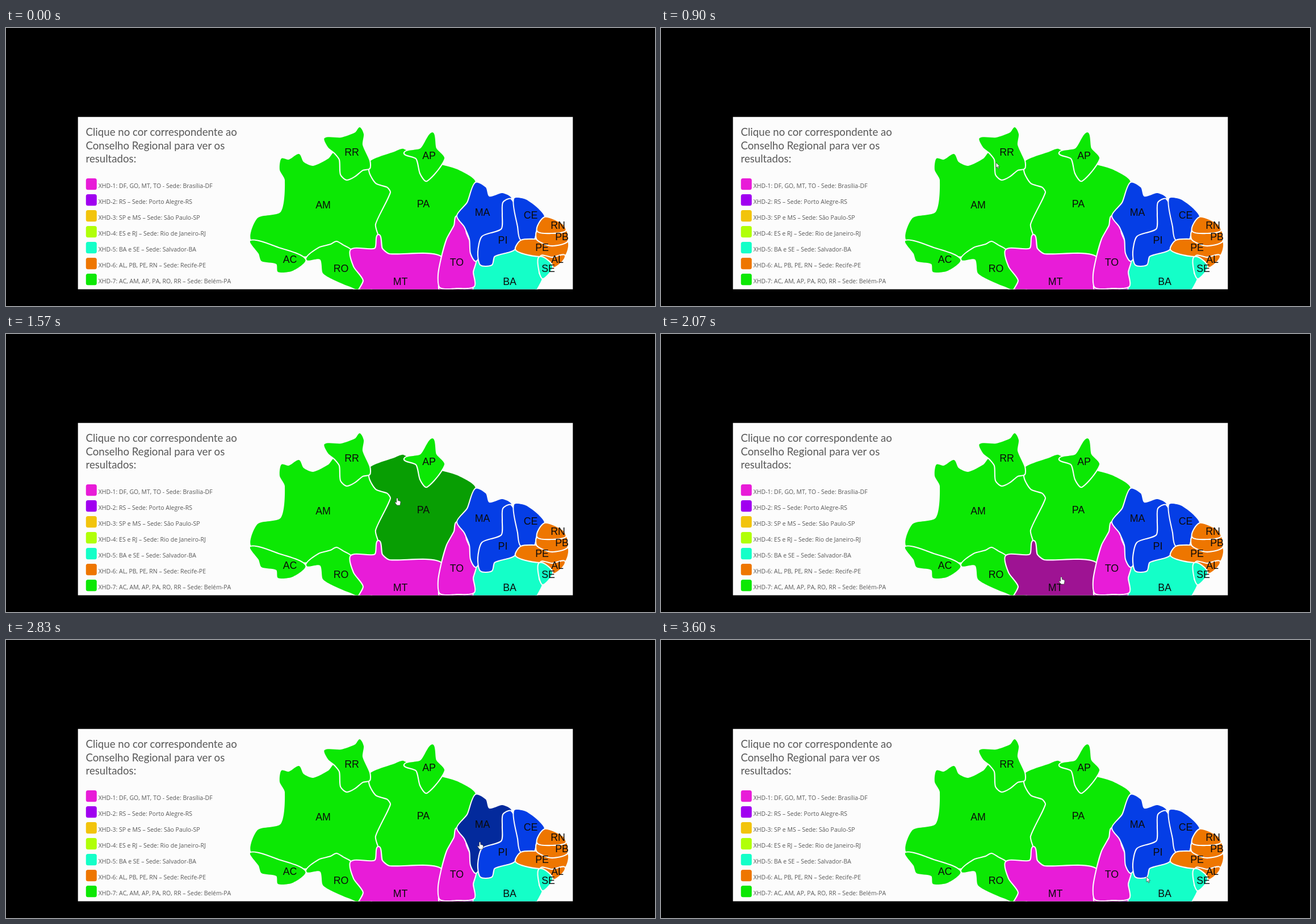
These frames come from a looping animation (1143x490 px, 3.63 s). An HTML page:

```html
<!DOCTYPE html>
<html lang="pt">
<head>
<meta charset="utf-8">
<title>Mapa por região</title>
<style>
  html, body { margin: 0; width: 100%; height: 100%; overflow: hidden; background: #000; }
  svg { display: block; }
  .heading { font: 18.65px Lato, sans-serif; fill: #585858; }
  .legend { font: 10.5px "Open Sans", sans-serif; fill: #585858; font-kerning: none; }
  .label { font: 17.8px "Liberation Sans", Arial, sans-serif; fill: #0b0b0b; text-anchor: middle; }
  /* The white outline lies outside each state, over the ones painted before. */
  #states path { stroke: #fcfcfc; stroke-width: 4.2; stroke-linejoin: round; paint-order: stroke; }
  #cursor path { fill: #fff; stroke: #333; stroke-width: .7; stroke-linejoin: round; }
</style>
</head>
<body>
<svg width="1143" height="490">
  <svg x="126.7" y="156.7" width="871.6" height="303.8" viewBox="126.7 156.7 871.6 303.8">
    <rect x="126" y="156" width="873" height="305" fill="#fcfcfc"/>
    <g id="texts"></g>
    <g id="states"></g>
    <g id="labels"></g>
    <g id="cursor">
      <path id="hand" d="M-1.3 1Q0-1 1.3 1V4.5L4.6 5.3Q6.4 5.8 6 8L5 13H-.5L-3.8 8.4-3.4 6.5-1.3 8Z"/>
      <path id="arrow" d="M0 0V9.5L2.2 7.6 3.8 11 5.2 10.3 3.7 7.1H6.6Z"/>
    </g>
  </svg>
</svg>
<script>
const LOOP = 3630;
const byId = id => document.getElementById(id);

const colors = {
  magenta: '#e81cd8', purple: '#a000f0', yellow: '#f2c40c', lime: '#b0ff08',
  teal: '#14ffc8', orange: '#ee7600', green: '#0ce804', blue: '#053ee6'
};

// Key points of each outline; later states cover the loose edges of earlier ones.
const states = [
  { id: 'BA', color: 'teal', label: [887, 453], points: '815,400 870,385 941,400 940,418 938,432 944,441 936,458 925,475 815,475' },
  { id: 'AM', color: 'green', label: [558.5, 318], points: '485,230 498,232 516,222 524,236 541,243 568,230 579,219 600,248 640,246 685,285 662,350 656,395 545,403 500,400 432,374 443,335 484,324 491,268 482,250' },
  { id: 'PA', color: 'green', label: [735, 316], points: '641,235 684,218 700,213 741,240 766,241 797,250 827,272 800,345 767,412 672,405 656,363 652,346 678,290 672,280 652,273 641,255' },
  { id: 'RR', color: 'green', label: [609, 225], points: '561,194 590,193 615,184 623,175 630,187 628,206 640,234 640,247 628,250 614,261 600,267 590,258 588,232 579,220 567,210' },
  { id: 'AP', color: 'green', label: [745, 231], points: '702,220 730,212 751,184 758,212 772,230 741,269 730,256 723,230' },
  { id: 'RO', color: 'green', label: [590, 430], points: '529,408 551,388 572,382 582,377 593,383 607,391 640,430 640,465 603,455 575,443 558,432 553,408' },
  { id: 'AC', color: 'green', label: [500, 414], points: '431,375 480,388 527,408 505,428 479,430 476,416 450,411 445,398' },
  { id: 'MT', color: 'magenta', label: [694.5, 453], points: '656,365 662,389 675,399 767,404 780,475 618,475 630,445 613,420 608,391 650,389' },
  { id: 'GO', color: 'magenta', points: '765,450 818,450 818,475 770,475' },
  { id: 'TO', color: 'magenta', label: [794, 419], points: '794,332 807,345 810,362 820,385 827,411 822,430 824,455 795,458 765,457 762,435 768,403 777,372 790,348' },
  { id: 'MA', color: 'blue', label: [839, 331], points: '827,273 845,281 851,297 874,291 890,300 880,350 840,385 828,410 819,397 817,372 808,350 795,331 813,308' },
  { id: 'PI', color: 'blue', label: [875, 380], points: '889,302 876,308 875,328 873,355 839,368 832,395 836,417 855,417 860,402 894,391 907,370 905,335' },
  { id: 'CE', color: 'blue', label: [924, 336], points: '895,301 915,302 936,317 948,333 934,355 929,373 907,373 902,350' },
  { id: 'PE', color: 'orange', label: [944, 393], points: '907,375 930,373 988,376 983,402 940,402 915,398 898,390' },
  { id: 'PB', color: 'orange', label: [979, 374], points: '936,359 985,356 988,376 960,383 936,373' },
  { id: 'RN', color: 'orange', label: [972, 354], points: '949,334 980,346 985,357 960,361 936,357' },
  { id: 'AL', color: 'orange', label: [971, 414], points: '942,403 962,405 984,402 963,422' },
  { id: 'SE', color: 'teal', label: [955, 430], points: '940,404 962,420 946,441 940,430' }
];

const legend = [
  ['magenta', 'DF, GO, MT, TO - Sede: Brasília-DF'],
  ['purple', 'RS – Sede: Porto Alegre-RS'],
  ['yellow', 'SP e MS – Sede: São Paulo-SP'],
  ['lime', 'ES e RJ – Sede: Rio de Janeiro-RJ'],
  ['teal', 'BA e SE – Sede: Salvador-BA'],
  ['orange', 'AL, PB, PE, RN – Sede: Recife-PE'],
  ['green', 'AC, AM, AP, PA, RO, RR – Sede: Belém-PA']
];

const heading = ['Clique no cor correspondente ao', 'Conselho Regional para ver os', 'resultados:'];

// Where the pointer rests; "edge" shows an arrow, "link" a hand without highlight.
const stops = [
  { arrive: 30, leave: 30, x: 455, y: 190, over: 'edge' },
  { arrive: 530, leave: 670, x: 525, y: 270, over: 'AM' },
  { arrive: 890, leave: 910, x: 590, y: 237, over: 'edge' },
  { arrive: 1000, leave: 1200, x: 613, y: 234, over: 'RR' },
  { arrive: 1570, leave: 1730, x: 689, y: 289, over: 'PA' },
  { arrive: 1900, leave: 2070, x: 705, y: 428, over: 'MT' },
  { arrive: 2470, leave: 2480, x: 816, y: 392, over: 'TO' },
  { arrive: 2630, leave: 2800, x: 832, y: 355, over: 'MA' },
  { arrive: 3030, leave: 3170, x: 883, y: 373, over: 'PI' },
  { arrive: 3200, leave: 3200, x: 883, y: 373, over: 'link' },
  { arrive: 3400, leave: 3430, x: 884, y: 405, over: 'BA' },
  { arrive: 3590, leave: LOOP, x: 855, y: 417, over: 'edge' }
];

// Closed smooth curve; handles follow the neighbours and scale with each side.
function smoothPath(text) {
  const points = text.split(' ').map(p => p.split(',').map(Number));
  const at = i => points[(i + points.length) % points.length];
  const handle = (i, reach) => {
    const [x0, y0] = at(i - 1), [x1, y1] = at(i + 1);
    const k = reach / Math.hypot(x1 - x0, y1 - y0);
    return [at(i)[0] + (x1 - x0) * k, at(i)[1] + (y1 - y0) * k];
  };
  const sides = points.map(([x, y], i) => {
    const end = at(i + 1);
    const reach = Math.hypot(end[0] - x, end[1] - y) * .22;
    return `C${[handle(i, reach), handle(i + 1, -reach), end]}`;
  });
  return `M${points[0]}${sides.join('')}Z`;
}

const text = (cls, x, y, s) => `<text class="${cls}" x="${x}" y="${y}">${s}</text>`;

byId('texts').innerHTML =
  heading.map((s, i) => text('heading', 140.5, 190 + i * 23.7, s)).join('') +
  legend.map(([color, s], i) =>
    `<rect x="140.8" y="${265 + i * 28}" width="19" height="20.2" rx="3.5" fill="${colors[color]}"/>` +
    text('legend', 162.7, 281.5 + i * 28, `XHD-${i + 1}: ${s}`)).join('');

byId('states').innerHTML = states
  .map(s => `<path id="${s.id}" d="${smoothPath(s.points)}"/>`).join('');

byId('labels').innerHTML = states
  .filter(s => s.label).map(s => text('label', ...s.label, s.id)).join('');

const darken = hex => '#' + hex.slice(1).match(/../g)
  .map(c => Math.round(parseInt(c, 16) * .68).toString(16).padStart(2, '0')).join('');

// Eases between stops; the hovered place changes halfway.
function pointerAt(t) {
  const i = stops.findLastIndex(s => s.arrive <= t);
  if (i < 0) return null;
  const from = stops[i], to = stops[i + 1] || from;
  const k = t <= from.leave ? 0 : (t - from.leave) / (to.arrive - from.leave);
  const eased = k * k * (3 - 2 * k);
  return {
    x: from.x + (to.x - from.x) * eased,
    y: from.y + (to.y - from.y) * eased,
    over: (k < .5 ? from : to).over
  };
}

function draw(t) {
  const pointer = pointerAt(t);
  for (const { id, color } of states)
    byId(id).setAttribute('fill', pointer?.over === id ? darken(colors[color]) : colors[color]);
  byId('cursor').style.display = pointer ? '' : 'none';
  if (!pointer) return;
  const onEdge = pointer.over === 'edge';
  byId('hand').style.display = onEdge ? 'none' : '';
  byId('arrow').style.display = onEdge ? '' : 'none';
  byId('cursor').setAttribute('transform', `translate(${pointer.x} ${pointer.y})`);
}

const start = performance.now();
function loop() {
  draw((performance.now() - start) % LOOP);
  requestAnimationFrame(loop);
}
loop();
</script>
</body>
</html>
```
